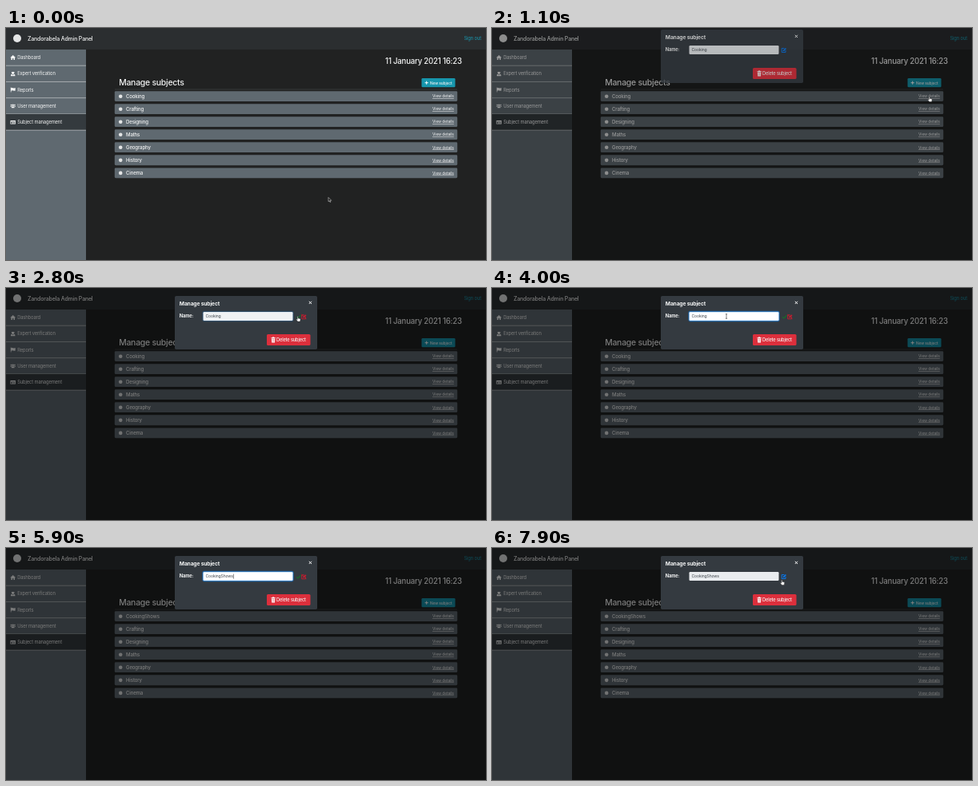
These frames come from a looping animation (600 by 291 pixels, 8000 ms). An HTML page:

```html
<!DOCTYPE html>
<html lang="en">
<head>
<meta charset="utf-8">
<title>Admin panel</title>
<style>
  html, body { margin: 0; width: 100%; height: 100%; overflow: hidden; background: #212222; }
  svg { display: block; width: 100vw; height: 100vh; }
  text { font: 400 5.8px Inter, "Liberation Sans", sans-serif; letter-spacing: -.022em; fill: #f4f5f5; }
  .brand { font-size: 6.95px; font-weight: 500; }
  .date { font-size: 9.65px; font-weight: 500; text-anchor: end; }
  .heading { font-size: 10.4px; font-weight: 500; }
  .subject { font-size: 6.05px; font-weight: 500; }
  .link { font-size: 4.95px; text-decoration: underline; }
  .button { font-weight: 500; }
  .title { font-size: 6.7px; font-weight: 700; }
  .label { font-size: 5.7px; font-weight: 700; }
  .value { font-size: 5.05px; fill: #3f464c; }
</style>
</head>
<body>
<svg viewBox="0 0 600 291" preserveAspectRatio="none">
  <defs>
    <g id="edit">
      <path d="M3.6 1H.5V6H5.3V3.5" fill="none" stroke="currentColor" stroke-width=".95"/>
      <path d="M1.9 4.8 2.2 3.3 5.1.4 6.3 1.6 3.4 4.5Z" fill="currentColor"/>
    </g>
    <path id="home" d="M0 3.1 3.2.2 6.4 3.1 5.8 3.7 5.5 3.4V6H3.9V4H2.5V6H.9V3.4L.6 3.7Z"/>
    <path id="expert" d="M1.5.8H4.9V2.2A1.7 1.6 0 0 1 1.5 2.2ZM.5 6V5Q.5 4 2 3.9L3.2 4.9 4.4 3.9Q5.9 4 5.9 5V6Z"/>
    <path id="flag" d="M.3.2H1V.8Q2.4.2 3.5.8T6.2.7V4.1Q4.8 4.7 3.6 4.1T1 4.3V6.2H.3Z"/>
    <path id="users" d="M3.2.9A1.2 1.2 0 1 1 3.19.9ZM1 1.2A.75.75 0 1 1 .99 1.2ZM5.4 1.2A.75.75 0 1 1 5.39 1.2ZM1.4 5.6V4.7Q1.4 3.6 3.2 3.6T5 4.7V5.6ZM0 4.3Q0 3 1.6 3.1L1.1 4.3ZM6.4 4.3Q6.4 3 4.8 3.1L5.3 4.3Z"/>
    <path id="card" fill-rule="evenodd" d="M0 1H6.4V5.7H0ZM.7 2.2V2.6H5.7V2.2ZM.8 3.3V4.8H2.6V3.3ZM3.4 3.4V3.8H5.6V3.4ZM3.4 4.4V4.8H5.6V4.4Z"/>
  </defs>

  <rect width="600" height="291" fill="#212222"/>
  <rect width="600" height="27" fill="#2b2e30"/>
  <circle cx="14" cy="13" r="5" fill="#e4e5e5"/>
  <text class="brand" x="27" y="15.6">Zandorabela Admin Panel</text>
  <text x="572.5" y="15.4" style="fill:#189bb3">Sign out</text>
  <rect y="27" width="100" height="264" fill="#5f6970"/>
  <g id="menu"></g>

  <text class="date" x="569.8" y="44.6">11 January 2021 16:23</text>
  <text class="heading" x="141.2" y="71.8">Manage subjects</text>
  <rect x="519.5" y="63" width="42" height="11.3" rx="1.3" fill="#1796ad"/>
  <path d="M523.6 68.7h4.2M525.7 66.6v4.2" stroke="#fff" stroke-width="1"/>
  <text class="button" x="530" y="70.6" style="font-size:4.85px">New subject</text>
  <path d="M136 77h428" stroke="#4d5052" stroke-width=".5"/>
  <g id="rows"></g>

  <rect id="backdrop" width="600" height="291" fill="#000"/>

  <g id="modal">
    <rect x="211" y="10" width="178" height="67" rx="1.8" fill="#343a40"/>
    <text class="title" x="216.8" y="22.2">Manage subject</text>
    <path d="M378.8 16.8l3.2 3.2M382 16.8l-3.2 3.2" stroke="#fff" stroke-width="1"/>
    <text class="label" x="216.8" y="37.3">Name:</text>
    <rect x="246.5" y="30" width="112" height="11" rx="1.3" fill="#e9ecef"/>
    <g id="focus">
      <rect x="245.9" y="29.4" width="113.2" height="12.2" rx="1.8" fill="none" stroke="#1b5e9c" stroke-width="1.2"/>
      <rect x="246.5" y="30" width="112" height="11" rx="1.3" fill="#fff" stroke="#6db0f2" stroke-width=".5"/>
    </g>
    <text id="value" class="value" x="249.5" y="37.4"></text>
    <rect id="caret" y="32.6" width=".5" height="6" fill="#222"/>
    <use id="editIcon" href="#edit" x="361.7" y="32.5" color="#0878ee"/>
    <g id="choices">
      <path d="M363 36.2l1.9 1.8 3.7-4" fill="none" stroke="#176b2b" stroke-width="1.2"/>
      <use href="#edit" x="369.2" y="32.8" color="#c01f30"/>
      <path d="M369.4 33.2l6 5.4" stroke="#c01f30" stroke-width=".9"/>
    </g>
    <rect x="326" y="58" width="54.5" height="14" rx="1.6" fill="#dc2f3c"/>
    <path d="M331.4 62.2h5.4v.9h-5.4zM333 61.6h2.2v.6h-2.2zM331.8 63.5h4.6l-.4 4.9h-3.8z" fill="#fff"/>
    <path d="M333.1 64.3v3.3M334.1 64.3v3.3M335.1 64.3v3.3" stroke="#dc2f3c" stroke-width=".35"/>
    <text class="button" x="338" y="67.1" style="font-size:5.65px">Delete subject</text>
  </g>

  <g id="pointer">
    <path id="arrow" d="M0 0V5.2L1.2 4.1 2 6 2.9 5.6 2.1 3.8H3.7Z" fill="#111" stroke="#eee" stroke-width=".5"/>
    <path id="hand" d="M.2 3.6V.5Q.7-.3 1.2.5V2.5L3.6 3Q4.2 3.2 4.1 4L3.6 6.6H.7L-1.2 4.2Q-1.2 3.3-.5 3.6L.2 4.2Z" fill="#fff" stroke="#222" stroke-width=".45"/>
    <path id="beam" d="M-1.1-3Q0-3 0-2.3Q0-3 1.1-3M0-2.5V2.5M-1.1 3Q0 3 0 2.3Q0 3 1.1 3" fill="none" stroke="#222" stroke-width=".55"/>
  </g>
</svg>

<script>
const LOOP = 8000, STEP = 100;
const $ = id => document.getElementById(id);
const clamp = v => Math.max(0, Math.min(1, v));
const show = (id, on) => $(id).setAttribute("visibility", on ? "visible" : "hidden");
const fade = (id, v) => $(id).setAttribute("opacity", v);

const menu = [["home", "Dashboard"], ["expert", "Expert verification"], ["flag", "Reports"],
  ["users", "User management"], ["card", "Subject management"]];
$("menu").innerHTML = menu.map(([icon, label], i) => {
  const y = 27 + i * 20.25;
  const active = i === 4 ? `<rect y="${y}" width="100" height="20.2" fill="#343a3e"/>` : "";
  return `${active}<use href="#${icon}" x="5.5" y="${y + 6.9}" fill="#f4f5f5"/>
    <text x="14.2" y="${y + 12.2}">${label}</text>
    <path d="M0 ${y + 20.2}h100" stroke="#c6cacc" stroke-width=".7"/>`;
}).join("");

const subjects = ["Cooking", "Crafting", "Designing", "Maths", "Geography", "History", "Cinema"];
$("rows").innerHTML = subjects.map((name, i) => {
  const y = 79.2 + i * 16.03;
  return `<rect x="135.8" y="${y}" width="428.4" height="12.8" rx="1.4" fill="#5f6970"/>
    <circle cx="143.2" cy="${y + 6.5}" r="2.3" fill="#e4e5e5"/>
    <text class="subject" x="150" y="${y + 8.6}">${name}</text>
    <text class="link" x="533" y="${y + 8.2}">View details</text>`;
}).join("");
const firstName = document.querySelector(".subject");
const firstLink = document.querySelector(".link");

// Pointer stops: time, x, y
const path = [[0, 403, 212.5], [900, 546, 86], [1100, 546, 86], [1700, 313, 49.5], [1800, 312.5, 49],
  [2600, 364, 35.5], [2800, 364, 35.5], [3500, 287, 35.5], [3700, 287, 35.5], [4000, 293, 35.5],
  [6300, 293, 35.5], [6800, 336, 45], [7200, 365.5, 36], [7700, 365.5, 36], [7900, 361.6, 39.8], [8000, 361.6, 39.8]];
const keyTimes = [4900, 5500, 5600, 5700, 5900];

function pointerAt(t) {
  const i = path.findIndex(p => p[0] > t);
  const [t0, x0, y0] = path[i - 1], [t1, x1, y1] = path[i];
  const u = (t - t0) / (t1 - t0), e = u * u * (3 - 2 * u);
  return [x0 + (x1 - x0) * e, y0 + (y1 - y0) * e];
}

function drawPointer(t) {
  const [x, y] = pointerAt(t);
  const overLink = t < 1200 && x > 533 && y < 92;
  const overIcon = t > 1800 && x > 360 && y < 42;
  const overInput = t > 2800 && x < 358.5 && y < 41;
  const kind = overLink || overIcon ? "hand" : overInput ? "beam" : "arrow";
  const visible = t < 4300 || t >= 6400;
  $("pointer").setAttribute("transform", `translate(${x} ${y})`);
  for (const k of ["arrow", "hand", "beam"]) show(k, visible && k === kind);
  firstLink.style.fill = overLink && t < 1100 ? "#a3a9ad" : "";
}

function render(t) {
  const slide = 1 - (1 - clamp((t - 1000) / 300)) ** 2.35;
  const opening = t > 1000 ? clamp((t - 985) / 150) : 0;
  fade("backdrop", opening * .5);
  fade("modal", opening);
  $("modal").setAttribute("transform", `translate(0 ${-20.8 * (1 - slide)})`);

  const editing = t >= 2800 && t < 7300;
  fade("focus", clamp((t - 2750) / 150) * (1 - clamp((t - 7250) / 150)));
  show("editIcon", !editing);
  show("choices", editing);

  const name = "Cooking" + "Shows".slice(0, keyTimes.filter(k => t >= k).length);
  firstName.textContent = $("value").textContent = name;
  $("caret").setAttribute("x", 249.7 + $("value").getComputedTextLength());
  show("caret", (t >= 4200 && t < 4400) || (t >= 4900 && t < 6400) || (t >= 6900 && t < 7300));
  drawPointer(t);
}

const start = performance.now();
function frame() {
  const t = (performance.now() - start) % LOOP;
  render(Math.floor(t / STEP) * STEP);
  requestAnimationFrame(frame);
}
frame();
</script>
</body>
</html>
```
